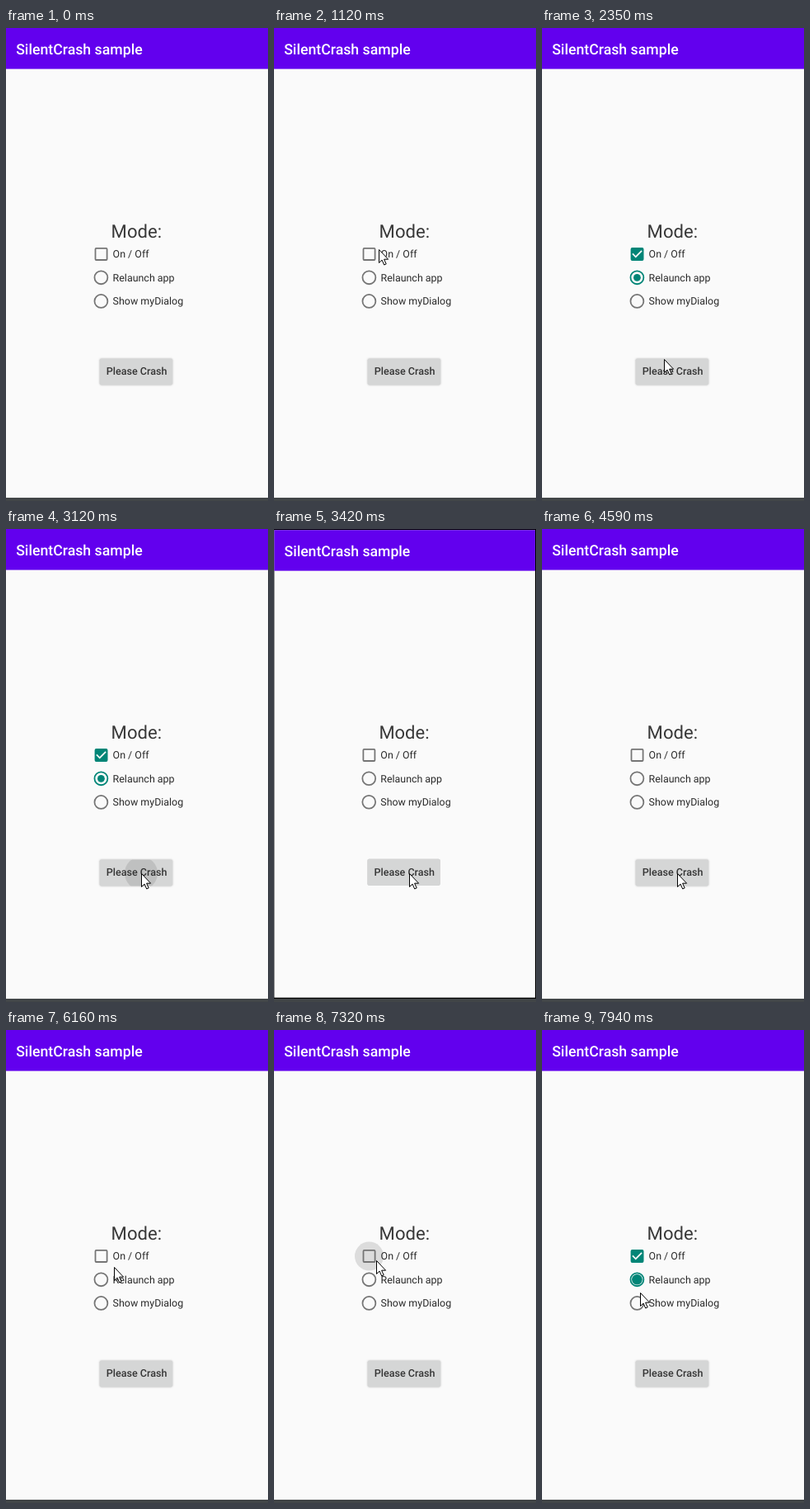
Write an HTML page that moves like this. It is 318 px wide and 573 px high and loops after 8000 ms.

```html
<!DOCTYPE html>
<html lang="en">
<head>
<meta charset="utf-8">
<title>SilentCrash sample</title>
<style>
  html, body { margin: 0; width: 100%; height: 100%; overflow: hidden; background: #fafafa; }
  svg { display: block; width: 318px; height: 573px; }
  text { font: 12.45px Roboto, Arial, sans-serif; fill: #2a2a2a; text-rendering: geometricPrecision; }
  .title { font-size: 17.7px; font-weight: 500; fill: #fff; }
  .mode { font-size: 22.08px; fill: #383838; }
  .action { font-size: 12.55px; font-weight: 500; fill: #343434; }
  .ring { fill: none; stroke: #757575; stroke-width: 1.77; }
  .on { stroke: #018577; }
  #box.on { fill: #018577; }
  .shadow { filter: drop-shadow(0 .8px .8px rgba(0, 0, 0, .22)); }
</style>
</head>
<body>
<svg viewBox="0 0 318 573">
  <defs>
    <clipPath id="buttonClip"><rect x="113.6" y="400.4" width="88.6" height="32" rx="1.8"/></clipPath>
  </defs>
  <rect width="318" height="573"/>

  <g id="app">
    <rect width="318" height="569" fill="#fafafa"/>
    <rect width="318" height="49.6" fill="#6200ee"/>
    <text class="title" x="12.2" y="32.2">SilentCrash sample</text>
    <text class="mode" x="158.3" y="253.6" text-anchor="middle">Mode:</text>

    <circle id="ripple" cx="115.5" cy="274"/>
    <rect id="box" class="ring" x="108.5" y="266.9" width="14.1" height="14.1" rx="1"/>
    <path id="check" fill="#fafafa" transform="translate(104.9 263.4) scale(.883)"
          d="M10 17l-5-5 1.41-1.41L10 14.17l7.59-7.59L19 8z"/>
    <circle id="radio" class="ring" cx="115.4" cy="302.3" r="7.95"/>
    <circle id="dot" cx="115.4" cy="302.3" fill="#018577"/>
    <circle class="ring" cx="115.4" cy="330.9" r="7.95"/>

    <text x="129.6" y="278.2">On / Off</text>
    <text x="129.6" y="306.8">Relaunch app</text>
    <text x="129.6" y="335.2">Show myDialog</text>

    <rect class="shadow" x="113.6" y="400.4" width="88.6" height="32" rx="1.8" fill="#d5d6d6"/>
    <g clip-path="url(#buttonClip)">
      <circle id="press" cx="164" cy="417" fill-opacity=".1"/>
    </g>
    <text class="action" x="158.6" y="420.4" text-anchor="middle">Please Crash</text>
  </g>

  <rect id="blank" width="318" height="569" fill="#fafafa"/>
  <rect y="569" width="318" height="4" fill="#424648"/>
  <path id="cursor" fill="#fff" stroke="#000" stroke-linejoin="round"
        d="M.5 .5V16.5L4.1 13.1L6.7 19L9.2 17.9L6.6 12.2H11.6Z"/>
</svg>
<script>
  const LOOP = 8000, STEP = 77;
  const APPEAR = 420, PRESS = 3120, RELAUNCH = 3420, BLANK = 3730, READY = 4590;

  // cursor path: first step, last step, end point
  const moves = [
    [APPEAR, 580, 147, 313],
    [810, 1120, 127, 268],
    [2270, 2350, 148, 401],
    [2420, 2500, 156, 467],
    [2580, 3040, 164, 417],
    [5540, 5780, 135, 296],
    [6010, 6160, 131, 287],
    [6770, 6850, 124, 279],
    [7786, 7940, 119, 318]
  ];
  const taps = [{ start: 1350, hold: 230, end: RELAUNCH }, { start: 7170, hold: 460, end: LOOP }];

  const el = {};
  document.querySelectorAll('svg [id]').forEach(node => el[node.id] = node);
  const set = (node, attrs) => { for (const k in attrs) node.setAttribute(k, attrs[k]); };
  const clamp = v => Math.min(1, Math.max(0, v));
  const stepped = age => Math.floor(age / STEP + .05) * STEP;
  const zoom = s => `translate(80 280) scale(${s}) translate(-80 -280)`;

  function cursorAt(t) {
    let x = 228, y = 566;
    for (const [from, to, endX, endY] of moves) {
      if (t < from) break;
      const gaps = Math.round((to - from) / STEP);
      const done = Math.floor(clamp((t - from) / (to - from)) * gaps + .001) + 1;
      x += (endX - x) * done / (gaps + 1);
      y += (endY - y) * done / (gaps + 1);
    }
    return [Math.round(x), Math.round(y)];
  }

  function drawTap(t) {
    const tap = taps.find(({ start, end }) => t >= start && t < end);
    const age = tap ? stepped(t - tap.start) : -1;
    const mark = tap ? age - tap.hold : -1;
    const on = mark >= 0;
    // the dot overshoots, then settles
    const dot = mark < 310 ? 6.3 * clamp(mark / 310) : Math.max(4.4, 6.3 - (mark - 310) * .013);
    el.box.classList.toggle('on', on);
    el.radio.classList.toggle('on', on);
    set(el.check, { opacity: mark >= STEP - 5 ? 1 : 0 });
    set(el.dot, { r: dot });
    set(el.ripple, {
      r: 17.5 * clamp(.5 + age / 300),
      opacity: tap ? .12 * clamp((690 - age) / 300) : 0,
      fill: on ? '#018577' : '#000'
    });
  }

  function drawWindows(t) {
    const grow = clamp(stepped(t - BLANK) / (2 * STEP));
    const pressed = t >= PRESS && t < RELAUNCH;
    set(el.press, { r: pressed ? 20 + stepped(t - PRESS) * .27 : 0 });
    set(el.app, { transform: zoom(t >= RELAUNCH && grow < 1 ? .9955 : 1) });
    set(el.blank, {
      transform: zoom(.94 + .06 * grow),
      opacity: t >= BLANK && t < READY ? .55 + .45 * grow : 0
    });
  }

  function draw(t) {
    drawTap(t);
    drawWindows(t);
    set(el.cursor, { transform: `translate(${cursorAt(t)})`, opacity: t < APPEAR ? 0 : 1 });
  }

  const start = performance.now();
  function loop() {
    draw((performance.now() - start) % LOOP);
    requestAnimationFrame(loop);
  }
  loop();
</script>
</body>
</html>
```
